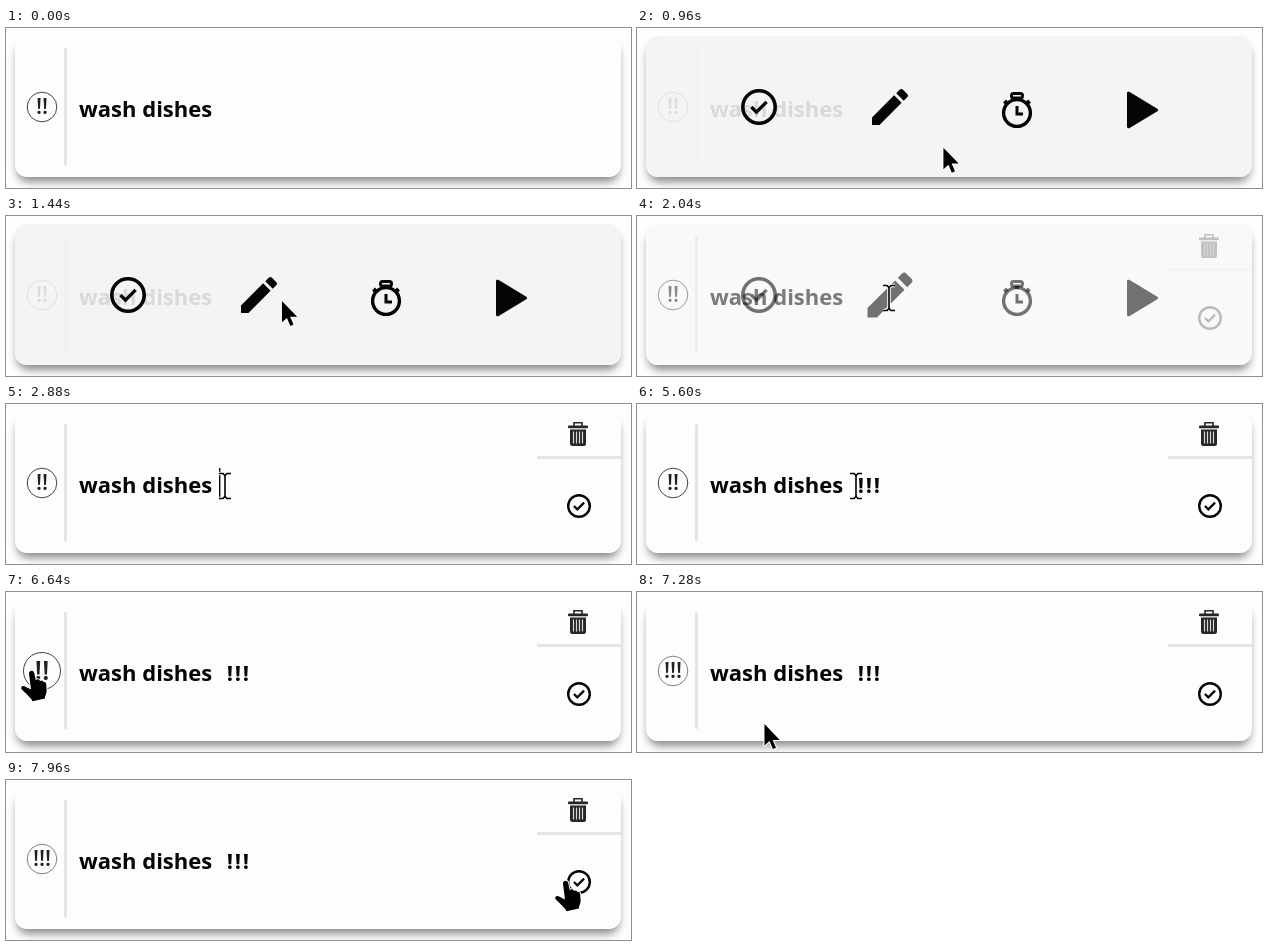
These frames come from a looping animation (625 px wide and 160 px high, 8000 ms). An HTML page with a canvas:

```html
<!DOCTYPE html>
<html lang="en">
<head>
<meta charset="utf-8">
<title>Task card</title>
<style>
  html, body { margin: 0; width: 100%; height: 100%; overflow: hidden; background: #fefefe; }
  canvas { display: block; }
</style>
</head>
<body>
<canvas id="stage" width="625" height="160"></canvas>
<script>
const LOOP = 8000;
const INK = '#050505', PAPER = '#fdfefc', RULE = '#e3e5e8';
const SANS = '"Open Sans", "Noto Sans", sans-serif';
const ctx = document.getElementById('stage').getContext('2d');

// Pointer path: time, x, y. Equal neighbours mean the pointer rests.
const PATH = [
  [520, 330, 166], [900, 310, 125], [1440, 276, 85], [1720, 252, 82], [2600, 252, 82],
  [2880, 219, 82], [5740, 219, 82], [6080, 125, 76], [6440, 27, 79], [6920, 27, 79],
  [7280, 127, 132], [7500, 300, 140], [7740, 501, 125], [7960, 561, 101], [8000, 561, 101]
];
const POINTERS = [[520, arrow], [1540, hand], [2040, iBeam], [6240, arrow], [6320, hand], [7080, arrow], [7880, hand]];
const CARET_ON = [[2840, 3400], [3880, 5600], [6120, 6640]];
const BANGS = [4520, 4760, 5120];

const PENCIL = new Path2D('M20.71 7.04c.39-.39.39-1.04 0-1.41l-2.34-2.34c-.37-.39-1.02-.39-1.41 0l-1.84 1.83 3.75 3.75zM3 17.25V21h3.75L17.81 9.93l-3.75-3.75z');
const ARROW = new Path2D('M0 0V21.5L5 17L8.4 25L11.6 23.6L8.2 15.9H15.3Z');
const HAND = new Path2D('M-4 2.5C-4-.8.6-1.2 1.2 2L2.8 9.2C4.2 7.8 6.4 8.2 7 10C8.4 8.8 10.2 9.6 10.6 11.2C12 10.6 13 11.6 13.2 13L13.6 19C13.8 23 11.8 24.5 12 27.5L-.5 30.3C-1.5 27.5-4.5 25.5-6.5 23L-11.2 18.6C-13 16.2-10 14-8 15.6L-2 18.4Z');

const ramp = (t, from, to) => {
  const k = Math.min(1, Math.max(0, (t - from) / (to - from)));
  return k * k * (3 - 2 * k);
};
const pulse = (t, on, off, span) => ramp(t, on, on + span) - ramp(t, off, off + span);

function slope(i, axis) {
  const a = PATH[i - 1], b = PATH[i], c = PATH[i + 1];
  const rests = (p, q) => p[1] === q[1] && p[2] === q[2];
  if (!a || !c || rests(a, b) || rests(b, c)) return 0;
  return (c[axis] - a[axis]) / (c[0] - a[0]);
}

function pointerAt(t) {
  let i = 0;
  while (i < PATH.length - 2 && t >= PATH[i + 1][0]) i++;
  const a = PATH[i], b = PATH[i + 1], span = b[0] - a[0];
  const k = (t - a[0]) / span, k2 = k * k, k3 = k2 * k;
  return [1, 2].map(n =>
    (2 * k3 - 3 * k2 + 1) * a[n] + (3 * k2 - 2 * k3) * b[n] +
    ((k3 - 2 * k2 + k) * slope(i, n) + (k3 - k2) * slope(i + 1, n)) * span);
}

function at(x, y, scale, draw) {
  ctx.save();
  ctx.translate(x, y);
  ctx.scale(scale, scale);
  draw();
  ctx.restore();
}

function faded(alpha, draw) {
  if (alpha <= 0) return;
  ctx.save();
  ctx.globalAlpha = alpha;
  draw();
  ctx.restore();
}

function stroke(points, width, color = INK) {
  ctx.beginPath();
  points.forEach(([x, y]) => ctx.lineTo(x, y));
  ctx.lineWidth = width;
  ctx.strokeStyle = color;
  ctx.stroke();
}

function ring(x, y, r, width, color = INK) {
  ctx.beginPath();
  ctx.arc(x, y, r, 0, Math.PI * 2);
  ctx.lineWidth = width;
  ctx.strokeStyle = color;
  ctx.stroke();
}

function box(x, y, w, h, r, color) {
  ctx.beginPath();
  ctx.roundRect(x, y, w, h, r);
  ctx.fillStyle = color;
  ctx.fill();
}

function label(text, x, y, font, color = INK, align = 'left') {
  ctx.font = `${font} ${SANS}`;
  ctx.textAlign = align;
  ctx.fillStyle = color;
  ctx.fillText(text, x, y);
}

function card() {
  ctx.save();
  ctx.shadowColor = 'rgba(0,0,0,.45)';
  ctx.shadowBlur = 8;
  ctx.shadowOffsetY = 5;
  box(11, 11, 602, 138, 12, PAPER);
  ctx.restore();
  box(9, 8, 606, 141, 12, PAPER);
}

function priority(t) {
  const scale = 1 + 0.25 * pulse(t, 6320, 7060, 150);
  const high = t >= 6940;
  ring(36, 79, 14.8 * scale, 1, high ? '#808080' : '#444');
  at(36, 79, scale, () => label(high ? '!!!' : '!!', 0, 7.2, '600 22px', '#222', 'center'));
}

function task(t) {
  const font = 'bold 22px';
  label('wash dishes', 73, 89, font);
  const typed = BANGS.filter(b => t >= b).length;
  for (let i = 0; i < typed; i++) label('!', 224 + 8 * i, 89, font, INK, 'center');
  if (CARET_ON.some(([on, off]) => t >= on && t < off)) {
    const x = t < 4240 ? 213 : 219.5 + 8 * typed;
    box(x, 64, 1.4, 31, 0, INK);
  }
}

function checkIcon() {
  ring(0, 0, 16.2, 3.6);
  stroke([[-7.6, 0], [-2.5, 5.1], [7.6, -5.1]], 3.4);
}

function stopwatch() {
  ring(0, 3, 13.4, 3.4);
  stroke([[0, -4], [0, 4], [6, 4]], 3);
  ctx.lineWidth = 3;
  ctx.beginPath();
  ctx.roundRect(-5.5, -16.5, 11, 4.5, 2);
  ctx.stroke();
  stroke([[0, -12], [0, -9]], 4);
  stroke([[-12.5, -9], [-10, -6.5]], 4);
  stroke([[12.5, -9], [10, -6.5]], 4);
}

function play() {
  ctx.beginPath();
  ctx.moveTo(-15, 0);
  ctx.arcTo(-15, -19.5, 17.5, 0, 1.5);
  ctx.arcTo(17.5, 0, -15, 19.5, 1.5);
  ctx.arcTo(-15, 19.5, -15, 0, 1.5);
  ctx.closePath();
  ctx.fillStyle = INK;
  ctx.fill();
}

function menu(t) {
  faded(pulse(t, 640, 1920, 260), () => {
    ctx.save();
    ctx.globalAlpha *= 0.89;
    box(9, 8, 606, 141, 12, '#f2f4f3');
    ctx.restore();
    at(122, 79, 1, checkIcon);
    at(253, 79, 2 * (1 + 0.25 * pulse(t, 1520, 2040, 150)), () => {
      ctx.translate(-12, -12);
      ctx.fillStyle = INK;
      ctx.fill(PENCIL);
    });
    at(380, 82, 1, stopwatch);
    at(505, 82, 1, play);
  });
}

function trash() {
  const dark = '#262626';
  stroke([[-4, -8], [-4, -11.2], [4, -11.2], [4, -8]], 1.6, dark);
  box(-10, -8.5, 20, 2.8, 1, dark);
  box(-8, -4.5, 16, 16.5, [0, 0, 2.5, 2.5], dark);
  for (let x = -4.5; x <= 4.5; x += 3) box(x - 0.6, -2.5, 1.2, 12, 0, '#d8d8d8');
}

function tools(t) {
  faded(ramp(t, 1920, 2160), () => {
    box(531, 52, 84, 3, 0, RULE);
    at(572, 30, 1, trash);
    at(573, 102, 2 / 3, checkIcon);
  });
}

function solid(path) {
  ctx.lineJoin = 'round';
  ctx.lineWidth = 2;
  ctx.strokeStyle = '#fff';
  ctx.fillStyle = '#000';
  ctx.stroke(path);
  ctx.fill(path);
}

function arrow() { solid(ARROW); }

function hand() { solid(HAND); }

function iBeam() {
  for (const [width, color] of [[3.6, '#fff'], [1.6, '#000']]) {
    stroke([[0, -10], [0, 10]], width, color);
    for (const s of [-1, 1]) {
      stroke([[-6, 12.5 * s], [-2, 12.5 * s], [0, 10.5 * s], [2, 12.5 * s], [6, 12.5 * s]], width, color);
    }
  }
}

function pointer(t) {
  const current = POINTERS.filter(([from]) => t >= from).pop();
  if (!current) return;
  const [x, y] = pointerAt(t);
  at(x, y, 1, current[1]);
}

function render(t) {
  ctx.fillStyle = '#fefefe';
  ctx.fillRect(0, 0, 625, 160);
  card();
  box(58, 20, 3, 117, 1, RULE);
  priority(t);
  task(t);
  tools(t);
  menu(t);
  pointer(t);
}

const start = performance.now();
function tick() {
  render((performance.now() - start) % LOOP);
  requestAnimationFrame(tick);
}
tick();
</script>
</body>
</html>
```
